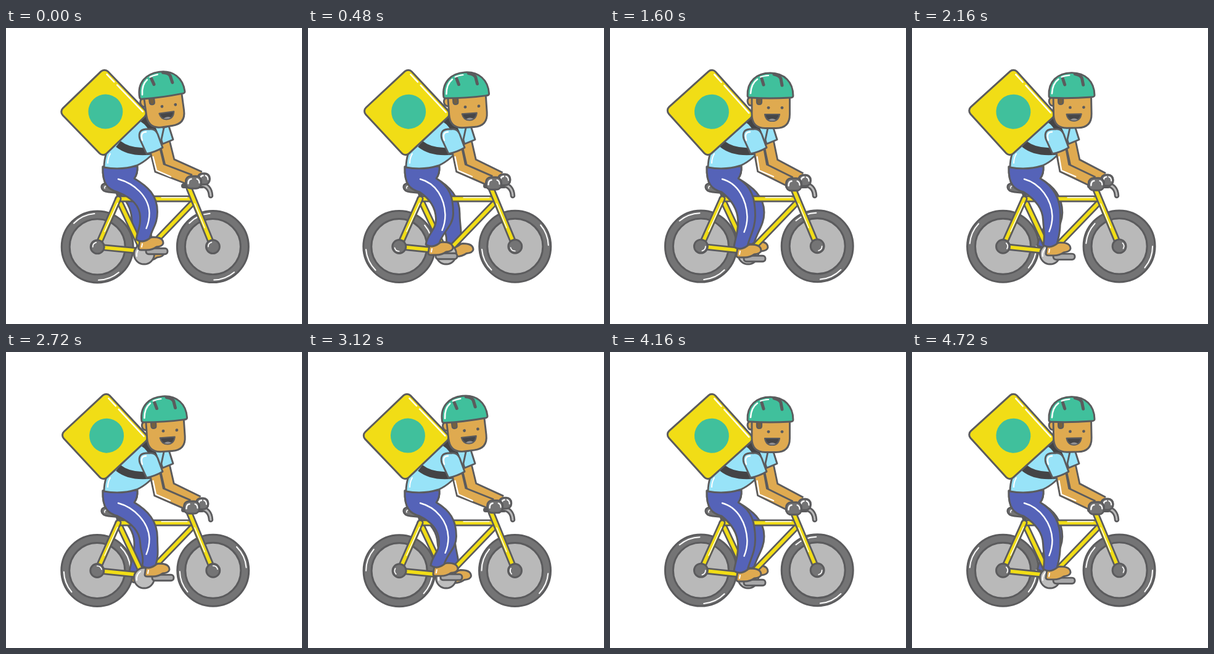
These frames come from a looping animation (480 by 480 pixels, 4800 ms). An HTML page:

```html
<!DOCTYPE html>
<html lang="en">
<head>
<meta charset="utf-8">
<title>Courier on a bicycle</title>
<style>
html, body { margin: 0; width: 100%; height: 100%; overflow: hidden; background: #fff; }
svg { display: block; width: 100vw; height: 100vh; }
</style>
</head>
<body>
<svg id="stage" viewBox="0 0 480 480"></svg>
<script>
const LOOP = 4800, STEP = 80, CYCLE = 8;
const INK = '#5b5b5d', YELLOW = '#f1dd16', TEAL = '#40c09c', SKIN = '#dfaa50',
      SHIRT = '#98e3f8', PANTS = '#5563b8', TYRE = '#747475', LIGHT = '#b9b9b9';
const svg = document.getElementById('stage');

const shape = (d, fill, width = 2.9) =>
  `<path d="${d}" fill="${fill}" stroke="${INK}" stroke-width="${width}" stroke-linejoin="round"/>`;
const line = (d, color, width, cap = 'round', join = 'round') =>
  `<path d="${d}" fill="none" stroke="${color}" stroke-width="${width}" stroke-linecap="${cap}" stroke-linejoin="${join}"/>`;
const shine = (d, width = 2) => line(d, '#fff', width);
const tube = (d, color, width) => line(d, INK, width) + line(d, color, width - 5.5);
const disc = (x, y, r, fill, width = 2.9) =>
  `<circle cx="${x}" cy="${y}" r="${r}" fill="${fill}" stroke="${INK}" stroke-width="${width}"/>`;
const bar = (x, y, w, h, rx, fill) =>
  `<rect x="${x - w / 2}" y="${y - h / 2}" width="${w}" height="${h}" rx="${rx}" fill="${fill}" stroke="${INK}" stroke-width="2.9"/>`;
const group = (transform, inner) => `<g transform="${transform}">${inner}</g>`;

function arc(r, from, to) {
  const at = a => `${(r * Math.cos(a * Math.PI / 180)).toFixed(2)},${(r * Math.sin(a * Math.PI / 180)).toFixed(2)}`;
  return `M${at(from)} A${r},${r} 0 0 1 ${at(to)}`;
}

function wheel({ x, y }, turn) {
  return group(`translate(${x} ${y})`,
    disc(0, 0, 58, TYRE, 3) + disc(0, 0, 45, LIGHT) +
    group(`rotate(${turn})`, shine(arc(54, 45, 85)) + shine(arc(54, 230, 268))));
}

function hub({ x, y }, turn) {
  return group(`translate(${x} ${y})`,
    disc(0, 0, 11, TYRE) + group(`rotate(${turn})`, shine(arc(7.5, 0, 75), 1.7)));
}

function foot({ x, y }) {
  return group(`translate(${x} ${y})`,
    shape('M-20,8 L-18,-5 L3,-10 Q20,-10 20,0 Q19,5 9,6 Q2,11 -7,11 H-16 Q-20,11 -20,8 Z', SKIN) +
    shine('M-15,6 L-14,1'));
}

function leg(k, f) {
  const bx = k.x - 28, by = k.y + 8;
  return shape(`M157,225 C156,254 166,262 181,266 Q${bx - 1},${by - 26} ${bx},${by}
    C${bx + 1},${by + 18} ${f.x - 21},${f.y - 24} ${f.x - 24},${f.y - 6}
    Q${f.x - 14},${f.y + 1} ${f.x - 2},${f.y - 8}
    C${f.x + 3},${f.y - 26} ${k.x},${k.y + 20} ${k.x},${k.y}
    C${k.x},${k.y - 27} 230,257 208,244 Q214,236 213,224 Z`, PANTS);
}

const legShine = k => shine(`M182,245 C208,252 ${k.x - 14},${k.y - 25} ${k.x - 13},${k.y + 2}
  Q${k.x - 13},${k.y + 15} ${k.x - 18},${k.y + 27}`, 2.4);

function frameTubes(rear, front) {
  const crank = '222,362', seat = '182,277', neck = '302,277';
  const ends = [`M${rear.x},${rear.y} L${crank}`, `M${seat} L${crank}`, `M227,362 L305,281`,
                `M${seat} L${neck}`, `M${seat} L${rear.x},${rear.y}`, `M297,260 L${front.x},${front.y}`];
  return ends.map(d => tube(d, YELLOW, 11)).join('') +
    shine('M181,284 L160,330', 1.4) + shine('M252,275 H294', 1.4) + shine('M306,285 L322,324', 1.4);
}

function saddle() {
  return line('M180,262 L183,274', INK, 7) +
    shape('M163,252 Q154,252 155,259 Q156,265 166,266 L186,268 Q190,260 180,255 Z', TYRE) +
    shine('M160,260 Q159,256 164,256', 1.6);
}

function bars() {
  return line('M288,256 H318', INK, 8) + tube('M317,254 Q331,256 332,272', LIGHT, 8.5);
}

const limb = d => line(d, INK, 19.5, 'butt', 'miter') + line(d, SKIN, 13.8, 'butt', 'miter');

function glove({ x, y }, w, h) {
  return group(`translate(${x} ${y})`,
    bar(0, 0, w, h, 8, TYRE) +
    shine(`M${4 - w / 2},2 Q${4 - w / 2},-5 ${9 - w / 2},-5.5`, 2.4) +
    shine(`M${w / 2 - 7},-5.5 Q${w / 2 - 3},-4 ${w / 2 - 3},1`, 2));
}

function torso() {
  return shape('M159,226 Q159,214 163,202 L214,150 Q232,150 256,162 L250,190 Q232,214 212,223 Q187,231 159,226 Z', SHIRT) +
    line('M182,188 Q202,204 238,199', '#444446', 12, 'butt') +
    line('M222,147 Q234,154 240,170', '#444446', 12) +
    shine('M165,219 Q165,211 169,204');
}

function sleeve() {
  return shape('M217,180 Q213,165 227,164 H233 Q242,163 246,172 L254,194 Q242,201 228,204 Z', SHIRT) +
    shine('M221,182 Q217,169 227,168.5', 2.4);
}

function crate(angle, dx) {
  const body = `<rect x="-51" y="-51" width="102" height="102" rx="8" fill="${YELLOW}" stroke="${INK}" stroke-width="3"/>` +
    shine('M46.5,-41 V-24', 2.4) + shine('M46.5,-17 V43', 2.4) +
    `<circle cx="3" cy="1" r="28" fill="${TEAL}"/>`;
  return group(`translate(${dx} 0) rotate(${angle} 159 207) translate(162 137) rotate(-42)`, body);
}

function head(angle) {
  return group(`rotate(${angle} 240 158)`,
    shape('M232,112 Q223,111 223,119 Q224,127 232,126 Z', SKIN) +
    shape('M230,106 H291.5 V140 Q291.5,162.5 269,162.5 H252 Q230,162.5 230,140 Z', SKIN) +
    shape('M238,110 H246 V120 Q246,124 242,124 Q238,124 238,120 Z', '#75603f', 2.2) +
    `<circle cx="257" cy="129.3" r="2.4" fill="${INK}"/><circle cx="279" cy="129.3" r="2.4" fill="${INK}"/>` +
    shape('M251,140 H275 Q273,151 263,151 Q253,151 251,140 Z', '#464648', 2.2) +
    '<path d="M257,149 Q263,145 269,149 Q263,152 257,149 Z" fill="#929294"/>' +
    shape('M223,110 C222,86 238,73 260,73 C283,73 297,88 297,110 Q297,113 292,113 Q258,115 228,113 Q223,113 223,110 Z', TEAL) +
    line('M246,82 L249,92', INK, 5) + line('M266,75 Q275,77 277,82 L279,93', INK, 5) +
    shine('M228,106 Q229,90 239,83', 2.6) + shine('M244,79.5 Q249,77.5 257,77', 2.2));
}

function draw(frame) {
  const p = frame % CYCLE, a = p * 2 * Math.PI / CYCLE;
  const c = Math.cos(a), s = Math.sin(a);
  const rear = { x: 147.8 + .4 * c, y: 354.5 + .4 * c };
  const front = { x: 335.8 - .4 * c, y: 354.2 + .4 * c };
  const near = { x: 230 + 5 * c + 15 * s, y: 355 - 6 * c - 2 * s };
  const far = { x: 236 - 12 * s, y: 361 + 5 * c + 1.5 * s };
  const knee = { x: 240.5 + 5 * c + 5 * s, y: 301 - 3 * c };
  const farKnee = { x: 241 - 9 * c - 5 * s, y: 301 + 2 * c };
  const grip = { x: 301 + 3 * c, y: 252 - 1.8 * c };
  const farGrip = { x: 318 + 2.5 * c, y: 246 - 1.2 * c };
  const sway = (1 + c) / 2;
  const turn = 180 + p * 360 / CYCLE;

  svg.innerHTML =
    wheel(rear, turn) + wheel(front, turn) +
    foot(far) + leg(farKnee, far) +
    saddle() + frameTubes(rear, front) + hub(rear, turn) + hub(front, turn) + bars() +
    disc(224, 366.5, 16.5, '#bebebe') + shine('M212,370 Q211,361 218,356') +
    bar(near.x + 9.5, near.y + 13, 35, 9.5, 4.5, '#a8a8a9') +
    foot(near) + leg(knee, near) + legShine(knee) +
    limb(`M257,184 L${265 + c * .7},219 L${farGrip.x - 6},${farGrip.y - 4}`) +
    shape('M246,164 L264,159 L271,181 L254,188 Z', SHIRT) +
    glove(farGrip, 20, 18) + torso() +
    limb(`M241,194 L${248 + c},227 L${grip.x - 5},${grip.y - 4}`) +
    shine(`M238.5,209 L${243 + c},231 L${266 + c},241`, 2.4) +
    sleeve() + glove(grip, 25, 20) +
    crate(-2 * sway, -sway) + head(-7.8 * sway);
}

let shown = -1;
function tick() {
  const frame = Math.floor(performance.now() % LOOP / STEP);
  if (frame !== shown) draw(shown = frame);
  requestAnimationFrame(tick);
}
tick();
</script>
</body>
</html>
```
